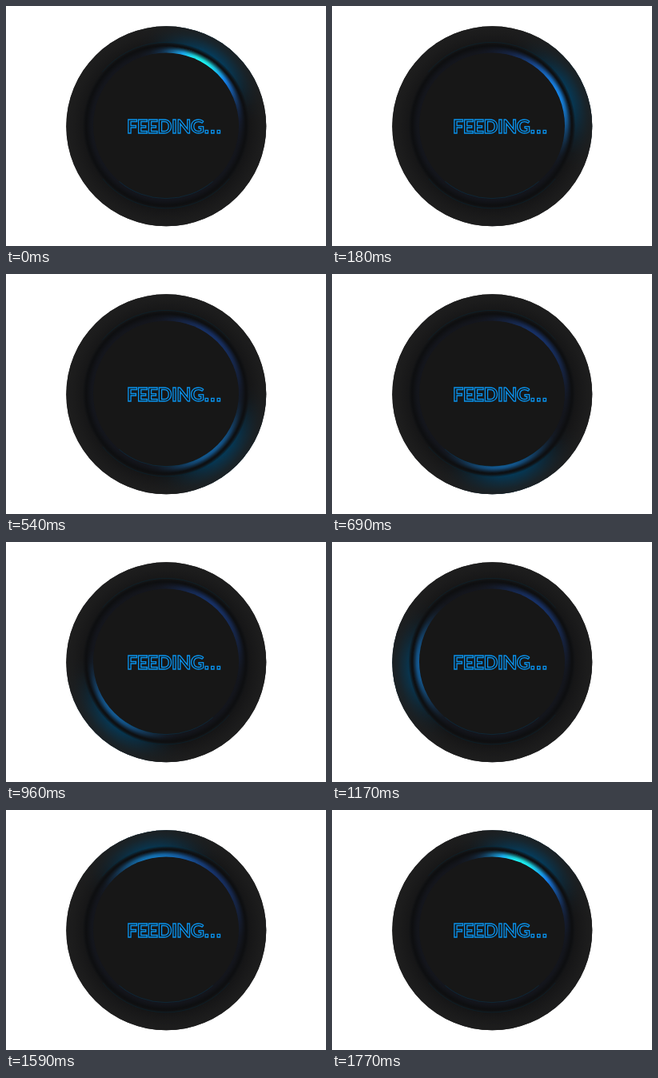
An HTML page with a canvas that plays this animation: 400 px wide and 300 px high, repeating every 1.8 s.

```html
<!DOCTYPE html>
<html lang="en">
<head>
<meta charset="utf-8">
<title>Feeding</title>
<style>
html, body { margin: 0; width: 100%; height: 100%; overflow: hidden; background: #fff; }
canvas, svg { position: absolute; left: 0; top: 0; display: block; }
text { fill: #131415; stroke: #0a92ec; stroke-width: 1.35; }
.word { font: 700 23.5px Lato, sans-serif; letter-spacing: -.55px; }
.dots { font: 700 24px "Liberation Sans", Arial, sans-serif; letter-spacing: .8px; }
</style>
</head>
<body>
<canvas id="stage" width="400" height="300"></canvas>
<svg width="400" height="300">
  <text class="word" x="150.9" y="158.8">FEEDING</text>
  <text class="dots" x="247.5" y="158.8">...</text>
</svg>
<script>
const ctx = document.getElementById('stage').getContext('2d');
const LOOP = 1800, STEP = 30;
const CX = 200, CY = 149.4; // centre of the face and its rim
const rad = deg => (deg - 90) * Math.PI / 180; // degrees clockwise from the top

function disc(x, y, r, fill) {
  ctx.beginPath();
  ctx.arc(x, y, r, 0, 2 * Math.PI);
  ctx.fillStyle = fill;
  ctx.fill();
}

// stops: [radius, colour] pairs from the inside out
function radial(x, y, stops) {
  const r0 = stops[0][0], r1 = stops[stops.length - 1][0];
  const g = ctx.createRadialGradient(x, y, r0, x, y, r1);
  for (const [r, c] of stops) g.addColorStop((r - r0) / (r1 - r0), c);
  return g;
}

// Conic light with a soft peak, fading over `back` and `ahead` degrees
function lobe(deg, back, ahead, rgb, alpha) {
  const g = ctx.createConicGradient(rad(deg - 180), CX, CY);
  for (let i = -6; i <= 6; i++) {
    const u = i / 6, a = alpha * (1 + Math.cos(Math.PI * u)) / 2;
    g.addColorStop(.5 + u * (u < 0 ? back : ahead) / 360, `rgba(${rgb},${a})`);
  }
  return g;
}

function line(r, from, to, color, width) {
  ctx.beginPath();
  ctx.arc(CX, CY, r, rad(from), rad(to));
  ctx.strokeStyle = color;
  ctx.lineWidth = width;
  ctx.stroke();
}

function draw(t) {
  const angle = 33 + 360 * t / LOOP;
  const near = Math.max(0, Math.cos((angle - 30) * Math.PI / 180));
  const boost = near ** 5, flare = near ** 9;

  ctx.fillStyle = '#fff';
  ctx.fillRect(0, 0, 400, 300);

  // Outer band with its travelling glow
  disc(200.3, 150.3, 125, '#151516');
  disc(200.3, 150.3, 125, lobe(angle - 5 + 6 * boost, 52, 52, '0,66,104', .8 + .2 * boost));
  disc(200.3, 150.3, 125, radial(201, 151, [
    [102, 'rgba(30,30,30,0)'], [110, 'rgba(30,30,30,.4)'],
    [118, 'rgba(30,30,30,.75)'], [126, 'rgba(30,30,30,.93)']]));

  // Groove
  disc(CX, CY, 104, radial(CX, CY, [
    [98, '#0d0e10'], [101, 'rgba(14,15,17,.95)'], [104, 'rgba(18,20,22,.3)']]));
  line(104, -50, 50, 'rgba(0,50,72,.4)', .8);
  line(103.5, 130, 230, 'rgba(0,50,72,.4)', .8);

  // Lit rim, brightest against the face
  disc(CX, CY, 99, '#14161d');
  disc(CX, CY, 99, lobe(38, 50, 68, '24,56,122', .85));
  ctx.globalCompositeOperation = 'lighter';
  disc(CX, CY, 99, lobe(angle, 54, 54, '0,86,150', .85 + .15 * boost));
  disc(CX, CY, 99, lobe(angle - 2, 40, 45, '0,62,100', .85 * boost));
  disc(CX, CY, 99, lobe(angle - 8, 30, 32, '8,80,50', flare));
  ctx.globalCompositeOperation = 'source-over';
  disc(CX, CY, 99.5, radial(CX, CY, [
    [91, 'rgba(14,15,17,0)'], [94, 'rgba(14,15,17,.18)'],
    [97, 'rgba(14,15,17,.65)'], [99.5, 'rgba(14,15,17,1)']]));

  // Face
  disc(CX, CY, 91, '#171717');
  line(91.2, 140, 220, 'rgba(0,74,112,.4)', .8);
}

function tick() {
  const t = performance.now() % LOOP;
  draw(Math.floor(t / STEP) * STEP);
  requestAnimationFrame(tick);
}
tick();
</script>
</body>
</html>
```
